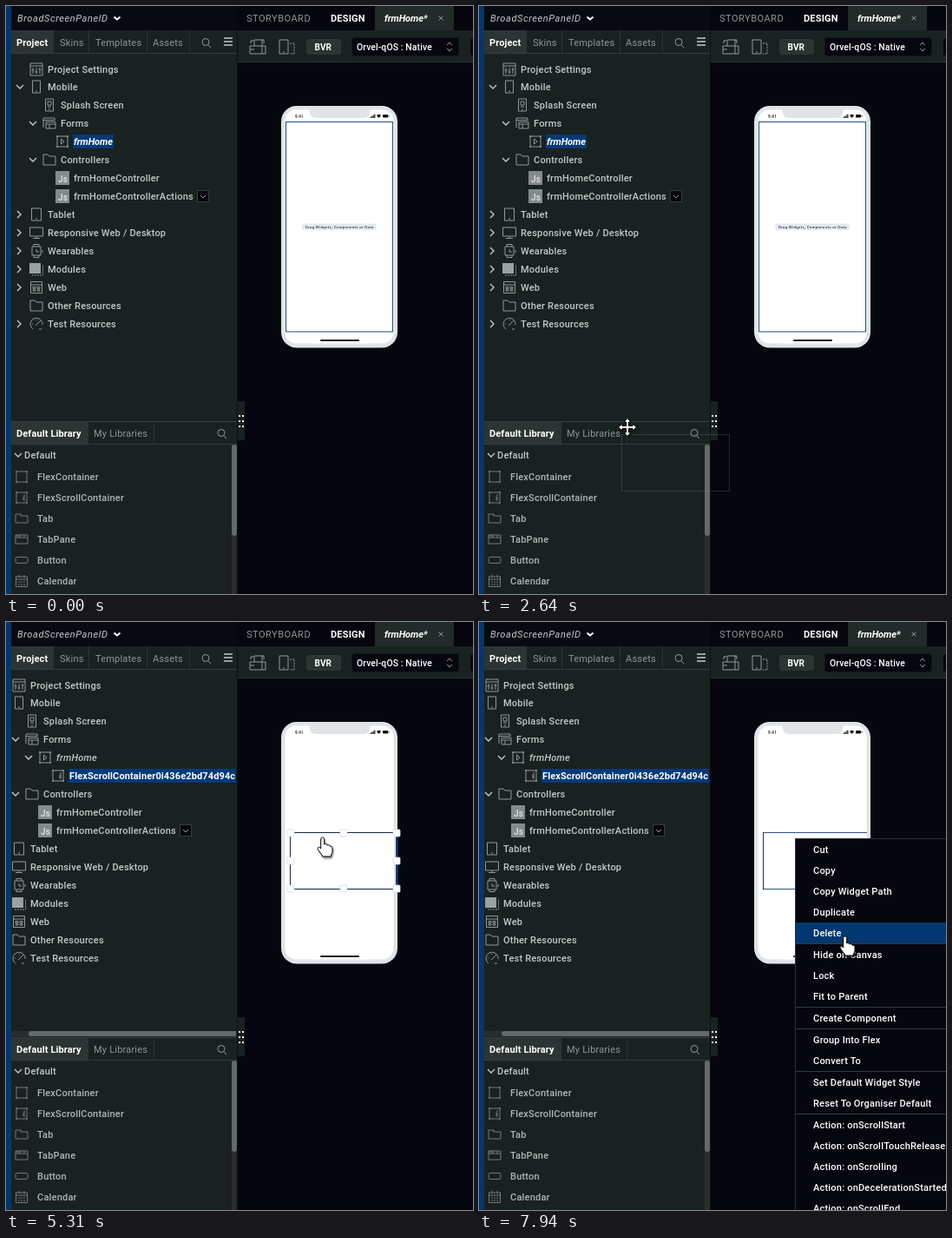
Write an HTML page that moves like this. It is 538 px wide and 677 px high and loops after 8 s.

```html
<!DOCTYPE html>
<html lang="en">
<head>
<meta charset="utf-8">
<title>Widget drag and drop</title>
<style>
html, body { margin: 0; width: 100%; height: 100%; overflow: hidden; background: #05060e; }
svg { display: block; width: 538px; height: 677px; }
text { font: 500 11px Roboto, sans-serif; letter-spacing: .2px; fill: #c3c8c8; white-space: pre; }
.b { font-weight: 700; fill: #fff; letter-spacing: .12px; }
.i { font-style: italic; }
.dim { fill: #8f9696; font-weight: 400; }
.lib { fill: #b0b5b5; }
.menu text { fill: #fff; }
.ico { fill: none; stroke: #929898; }
.chev { fill: none; stroke: #c3c8c8; stroke-width: 1.4; }
#cursor path { fill: #fff; stroke: #000; stroke-linejoin: round; filter: drop-shadow(1px 2px 1px #0007); }
</style>
</head>
<body>
<svg id="stage" viewBox="0 0 538 677"></svg>
<script>
const PANEL = '#1a2121', DARK = '#05060e', BLUE = '#02386f', LIT = '#2c3534', BEZEL = '#dfe5e7';

const rect = (x, y, w, h, fill, more = '') =>
  `<rect x="${x}" y="${y}" width="${w}" height="${h}" fill="${fill}" ${more}/>`;
const text = (x, cy, s, cls = '', more = '') =>
  `<text x="${x}" y="${cy + 4}" class="${cls}" ${more}>${s}</text>`;
const path = (x, y, d, cls = 'ico', more = '') =>
  `<path transform="translate(${x} ${y})" d="${d}" class="${cls}" ${more}/>`;
const group = (id, body, more = '') => `<g id="${id}" ${more}>${body}</g>`;

const CORNERS = 'M-6-6H6V6H-6Z' +
  [[-6, -6], [6, -6], [-6, 6], [6, 6]].map(([x, y]) => `M${x - 1} ${y}h2M${x} ${y - 1}v2`).join('');
const FOLDER = 'M-7 6V-6H-2L0-4H7V6Z';
const PHONE = 'M-4.5-7H4.5V7H-4.5ZM-1 5H1';
const LENS = 'M3 3 6 6M4-.5A4 4 0 1 1-4-.5A4 4 0 1 1 4-.5';
const DOWN = 'M-4-2 0 2 4-2', RIGHT = 'M-2-4 2 0-2 4';
const icons = {
  settings: 'M-7-7H7V7H-7ZM-7-4H7M-4-2V5M0-2V5M4-2V5M-5.5 1h3M-1.5 3h3M2.5 0h3',
  phone: PHONE,
  splash: PHONE + 'M-2-4H2V0H-2ZM-2 2H2',
  forms: 'M-7 5V-6H6V-3M-7-3.5H6M-4-1.5H7V6H-4ZM-4 1H7M0 1V6',
  form: CORNERS + 'M-1.5-3 2 0-1.5 3Z',
  folder: FOLDER,
  tablet: 'M-5.5-7H5.5V7H-5.5ZM-1 5H1',
  desktop: 'M-7.5-6H7.5V4H-7.5ZM-4 6.5H4M0 4V6',
  watch: 'M-3-5V-7.5H3V-5M-3 5V7.5H3V5M-5-5H5V5H-5ZM7-1V2M0-2V1H3',
  web: 'M-6.5-6.5H6.5V6.5H-6.5ZM-6.5-3H6.5M-4-.5h3v2h-3ZM1-.5h3v2H1ZM-4 3h3v1h-3ZM1 3h3v1H1Z',
  gauge: 'M-4 6A7 7 0 1 1 7 1M-1 2 5-4M3 6H6M-5 0h1M0-5v1',
  flex: CORNERS,
  scroll: CORNERS + 'M3-4V4M2-1V3',
  tab: 'M-7 5V-5H-1V-3H7V5Z',
  tabs: 'M-7 5V-5H7V5ZM-7-2H7M-2-5V-2M-7-4H-2M3-5V-2',
  button: 'M-5-3.5H5Q7-3.5 7-1.5V1.5Q7 3.5 5 3.5H-5Q-7 3.5-7 1.5V-1.5Q-7-3.5-5-3.5Z',
  calendar: 'M-6.5-5H6.5V6.5H-6.5ZM-6.5-2H6.5M-3-7V-4M3-7V-4M-4 1h2M-1 1h2M2 1h2M-4 4h2M-1 4h2M2 4h2'
};

function icon(name, x, y) {
  if (name == 'js') return rect(x - 8, y - 8, 16, 16, '#858b8b') +
    text(x - 5, y + 1, 'Js', '', 'style="fill:#e4e7e7;font-size:10px"');
  if (name == 'modules') return rect(x - 8, y - 7, 13, 12, '#9ca1a1') +
    path(x, y, 'M-5 7H7.5V-5', 'ico', 'stroke-dasharray="2 1"');
  return path(x, y, icons[name]);
}

// level, icon, label, chevron
const nodes = [
  [0, 'settings', 'Project Settings'], [0, 'phone', 'Mobile', DOWN], [1, 'splash', 'Splash Screen'],
  [1, 'forms', 'Forms', DOWN], [2, 'form', 'frmHome'], [1, 'folder', 'Controllers', DOWN],
  [2, 'js', 'frmHomeController'], [2, 'js', 'frmHomeControllerActions'], [0, 'tablet', 'Tablet', RIGHT],
  [0, 'desktop', 'Responsive Web / Desktop', RIGHT], [0, 'watch', 'Wearables', RIGHT],
  [0, 'modules', 'Modules', RIGHT], [0, 'web', 'Web', RIGHT], [0, 'folder', 'Other Resources'],
  [0, 'gauge', 'Test Resources', RIGHT]
];

function tree(added) {
  const list = nodes.slice();
  if (added) {
    list[4] = [2, 'form', 'frmHome', DOWN];
    list.splice(5, 0, [3, 'scroll', 'FlexScrollContainer0i436e2bd74d94c']);
  }
  return list.map(([level, ico, label, chev], n) => {
    const y = n ? 72 + 21 * n : 73, x = 48 + 15 * level;
    const picked = n == (added ? 5 : 4);
    let cls = '', more = '', out = '';
    if (picked) {
      out = rect(x - 1, y - 8, added ? 193 : 47, 16, '#033a78');
      cls = added ? 'b' : 'b i';
      more = `style="letter-spacing:${added ? .12 : -.1}px"`;
    } else if (label == 'frmHome') cls = 'i';
    if (label.endsWith('Actions'))
      out += rect(220.5, y - 6.5, 13, 13, DARK, 'stroke="#343d3d"') + path(227, y, 'M-3-1 0 2 3-1');
    if (chev) out += path((chev == DOWN ? 16 : 15) + 15 * level, y, chev, 'chev');
    return out + icon(ico, x - 13, y) + text(x, y, label, cls, more);
  }).join('');
}

const library = [['flex', 'FlexContainer'], ['scroll', 'FlexScrollContainer'], ['tab', 'Tab'],
  ['tabs', 'TabPane'], ['button', 'Button'], ['calendar', 'Calendar']];

const menuGroups = [
  ['Cut', 'Copy', 'Copy Widget Path', 'Duplicate', 'Delete'],
  ['Hide on Canvas', 'Lock', 'Fit to Parent'], ['Create Component'], ['Group Into Flex', 'Convert To'],
  ['Set Default Widget Style', 'Reset To Organiser Default'],
  ['ScrollStart', 'ScrollTouchReleased', 'Scrolling', 'DecelerationStarted', 'ScrollEnd'].map(s => 'Action: on' + s)
];
const rows = [];
let menuText = '', rowY = 262;
menuGroups.forEach((items, g) => {
  if (g) {
    menuText += rect(365, rowY - 12, 173, 1, '#343a40');
    rowY++;
  }
  for (const s of items) {
    rows.push(rowY);
    menuText += text(385, rowY, s);
    rowY += 24;
  }
});

const topBar = rect(6, 0, 260, 28, '#080a12') +
  text(13, 14, 'BroadScreenPanelD', 'i', 'style="letter-spacing:.6px;font-weight:400"') +
  path(128, 14, 'M-3.5-1.5 0 1.5 3.5-1.5', 'chev', 'style="stroke:#fff;stroke-width:2"') +
  text(277, 14, 'STORYBOARD', 'dim', 'style="letter-spacing:.5px"') +
  text(374, 14, 'DESIGN', 'b', 'style="letter-spacing:.2px"') +
  rect(425, 0, 91, 28, '#232a2a') +
  text(436, 14, 'frmHome*', 'b i', 'style="letter-spacing:-.1px"') +
  path(501, 14, 'M-2.5-2.5 2.5 2.5M2.5-2.5-2.5 2.5') +
  rect(267, 28, 271, 37, PANEL) + rect(267, 64, 271, 1, '#2a3132') +
  path(290, 47, 'M-9-1H9V8H-9ZM-4-1V-8H5V-1M-4 3H-9M7-4V-8H4M-8-4V-7H-5M5-1V8') +
  path(323, 47, 'M-8-8H2V8H-8ZM-4 6H-2') + path(323, 47, 'M4-4H9V8H4', 'ico', 'stroke-dasharray="2 1"') +
  rect(346, 38, 40, 18, LIT, 'rx="3"') + text(355.5, 47, 'BVR', 'b', 'style="font-size:10px"') +
  rect(398.5, 36.5, 123, 21, DARK, 'rx="3" stroke="#11171a"') +
  text(404, 47, 'Orvel-qOS : Native', 'b', 'style="font-size:10.4px;font-weight:500"') +
  path(511, 47, 'M-3-2 0-5 3-2M-3 2 0 5 3 2') + rect(535, 37, 8, 20, DARK, 'rx="3"');

const leftPanel = rect(0, 0, 6, 677, '#033770') + rect(6, 28, 260, 649, PANEL) +
  rect(6, 28, 48, 26, LIT) + text(12, 42, 'Project', 'b') +
  [[62, 'Skins'], [103, 'Templates'], [169, 'Assets']].map(([x, s]) => text(x, 42, s, 'dim')).join('') +
  [54, 95, 162, 211].map(x => rect(x, 28, 1, 26, '#2b3333')).join('') +
  path(230, 42, LENS) + path(256, 41, 'M-5-4H5M-5 0H5M-5 4H5', 'chev') +
  rect(6, 54, 260, 1, '#333b3b') + rect(266, 28, 1, 649, '#0c1013');

const libraryPanel = rect(6, 478, 260, 1, '#363e3e') + rect(6, 479, 89, 25, LIT) +
  text(12, 492, 'Default Library', 'b') + text(101, 492, 'My Libraries', 'dim') +
  rect(170, 479, 1, 25, '#2b3333') + path(248, 492, LENS) + rect(6, 504, 260, 1, '#333b3b') +
  path(14, 517, DOWN, 'chev') + text(21, 517, 'Default') +
  group('libIcons', library.map(([ico], n) => icon(ico, 18, 542 + 24 * n)).join(''), 'opacity=".75"') +
  library.map(([, s], n) => text(36, 542 + 24 * n, s, 'lib', `id="lib${n}"`)).join('') +
  rect(260, 505, 6, 172, '#2a2d2d') + rect(260, 505, 6, 105, '#646a6a', 'rx="3"') +
  rect(267, 455, 8, 45, PANEL) +
  [472, 478, 484].map(y => rect(268, y - 1, 2, 2, '#fff') + rect(272, y - 1, 2, 2, '#fff')).join('');

const phone = rect(317, 115, 134, 278.5, BEZEL, 'rx="18"') + rect(321.5, 119.5, 125, 269, '#fff', 'rx="13"') +
  `<path d="M347 119Q350 119 350 122 350 129 357 129H412Q419 129 419 122 419 119 422 119Z" fill="${BEZEL}"/>` +
  text(333, 124.6, '9:41', '', 'style="font-size:4.6px;fill:#333;font-weight:700"') +
  [0, 1, 2, 3].map(n => rect(419.5 + 1.6 * n, 127.6 - n, 1.1, 1.4 + n, '#111')).join('') +
  '<path d="M427 126Q429.5 123.5 432 126L429.5 129Z" fill="#111"/>' +
  rect(434, 125, 6, 3.5, '#111', 'rx=".8"') + rect(440.5, 126, 1, 1.5, '#111') +
  rect(362, 384, 45, 2, '#0a0a0a', 'rx="1"') +
  group('empty', rect(322.5, 133.5, 123, 241.5, 'none', 'stroke="#1d4f80"') +
    rect(341, 250.5, 86, 7.5, '#e6e9ec', 'rx="3.7"') +
    text(345, 252, 'Drag Widgets, Components or Data', '',
      'style="font-size:4.3px;fill:#2c3a4c;letter-spacing:.35px"'));

const widget = group('widget', rect(327, 242, 120, 66, '#fff') +
  '<path d="M447 242.5H327.5V307.5H447" fill="none" stroke="#2f5484"/><path d="M327.5 242V308" stroke="#2a2d3c"/>');
const handles = group('handles',
  '<path d="M451 242.5H327.5V307.5H451" fill="none" stroke="#14263f"/>' + rect(449, 242, 2.5, 66, '#0c4080') +
  [328, 389, 450].map(x => [243, 275, 307].map(y => x == 389 && y == 275 ? '' :
    rect(x - 4, y - 4, 8, 8, '#fff', 'stroke="#d5d9dc" stroke-width=".8" rx="1"')).join('')).join(''));

const ghostBox = (stroke, more) =>
  rect(.5, .5, 124, 65, 'none', `class="ghost" stroke="${stroke}" stroke-dasharray="2 1" ${more}`);
const shapes = {
  arrow: 'M.5.5V16.5L4 13 6.7 18.6 9 17.6 6.4 12H11.5Z',
  hand: 'M-2.3 2C-2.3-.6 1.7-.6 1.7 2V8C2.5 7 4 7 4.9 9 6.5 8 8 9 8.2 10.3 10 9.6 11 10.6 11 12V16' +
    'C11 18.5 9.4 19 9.4 22H-.2C-.2 20-4.6 16.5-5.7 13.4-6.4 11.2-4 10.3-2.3 13Z',
  move: 'M0-10.5 4-6H1.5V-1.5H6V-4L10.5 0 6 4V1.5H1.5V6H4L0 10.5-4 6H-1.5V1.5H-6V4L-10.5 0-6-4V-1.5H-1.5V-6H-4Z'
};

const stage = document.getElementById('stage');
stage.innerHTML = `<defs><clipPath id="pane">${rect(6, 55, 259, 422, '#000')}</clipPath>
  <clipPath id="body">${rect(317, 115, 134, 261, '#000', 'rx="17"')}</clipPath></defs>` +
  rect(0, 0, 538, 677, DARK) + topBar + leftPanel +
  `<g clip-path="url(#pane)">` + group('before', tree(false)) + group('after', tree(true)) +
  group('bar', rect(6, 471, 260, 6, '#2a2d2d') + rect(6, 471, 241, 6, '#646a6a', 'rx="3" id="thumb"')) + '</g>' +
  libraryPanel + phone + widget + handles +
  group('drag', ghostBox('#80868c', 'opacity=".4"') +
    `<g clip-path="url(#body)">${ghostBox('#5583ad', '')}</g>`) +
  group('menu', rect(364.5, 249.5, 180, 440, DARK, 'stroke="#2c3238"') +
    rect(365, 250, 173, 24, BLUE, 'id="hover"') + menuText, 'class="menu"') +
  group('tip', rect(110.5, 580.5, 440, 24, '#fff', 'stroke="#b9bdc2"') +
    text(118, 593, 'Scrollable Container to arrange widgets in a horizontal, vertical or a free form layout', '',
      `style="font:400 11.4px 'Open Sans',sans-serif;fill:#24446b;letter-spacing:0"`)) +
  group('cursor', '<path id="shape"/>');

const $ = id => document.getElementById(id);
const show = (id, on) => $(id).setAttribute('display', on ? 'inline' : 'none');
const move = (el, x, y) => el.setAttribute('transform', `translate(${x} ${y})`);

// first step, last step, number of steps, end point
const moves = [
  [460, 580, 3, 236, 622], [780, 960, 4, 103, 567], [1160, 1280, 3, 101, 565],
  [2400, 3180, 14, 298, 342], [3240, 3240, 1, 304, 326], [3300, 3700, 7, 339, 250],
  [3760, 3910, 3, 326, 242], [4880, 5310, 7, 365, 248], [6370, 6430, 2, 376, 251],
  [6490, 7030, 10, 405, 305], [7760, 7940, 4, 422, 362]
];

function pointer(t) {
  let x = 471, y = 670;
  for (const [from, to, n, x1, y1] of moves) {
    if (t < from) break;
    const gap = (to - from) / (n - 1) || 1;
    const p = Math.min(1, (Math.floor((t - from) / gap + 1e-6) + 1) / n);
    x += (x1 - x) * p;
    y += (y1 - y) * p;
  }
  return [x, y];
}

function draw(t) {
  const [x, y] = pointer(t), [px, py] = pointer(t - 60);
  const added = t >= 4690, shift = t >= 4880 ? 20 : 0;
  show('before', !added);
  show('after', added);
  show('bar', added);
  move($('after'), -shift, 0);
  move($('thumb'), shift, 0);
  $('lib1').setAttribute('class', t >= 960 && t < 2400 ? 'b' : 'lib');
  show('tip', t >= 1740 && t < 2200);
  show('empty', t < 4630);
  show('widget', t >= 4630);
  show('handles', t >= 4880 && t < 5970);
  show('drag', t >= 2400 && t < 4630);
  // the dragged outline trails the pointer
  for (const el of document.querySelectorAll('.ghost'))
    move(el, Math.round((x + px) / 2), Math.round((y + py) / 2));
  show('menu', t >= 5970);
  const row = rows.find(r => Math.abs(y - r) <= 12);
  show('hover', t >= 6370 && row);
  if (row) $('hover').setAttribute('y', row - 12);
  show('cursor', t >= 460);
  move($('cursor'), Math.round(x), Math.round(y));
  const shape = t < 960 ? 'arrow' : t >= 2400 && t < 4880 ? 'move' : 'hand';
  $('shape').setAttribute('d', shapes[shape]);
}

const start = performance.now();
function tick() {
  draw((performance.now() - start) % 8000);
  requestAnimationFrame(tick);
}
tick();
</script>
</body>
</html>
```
